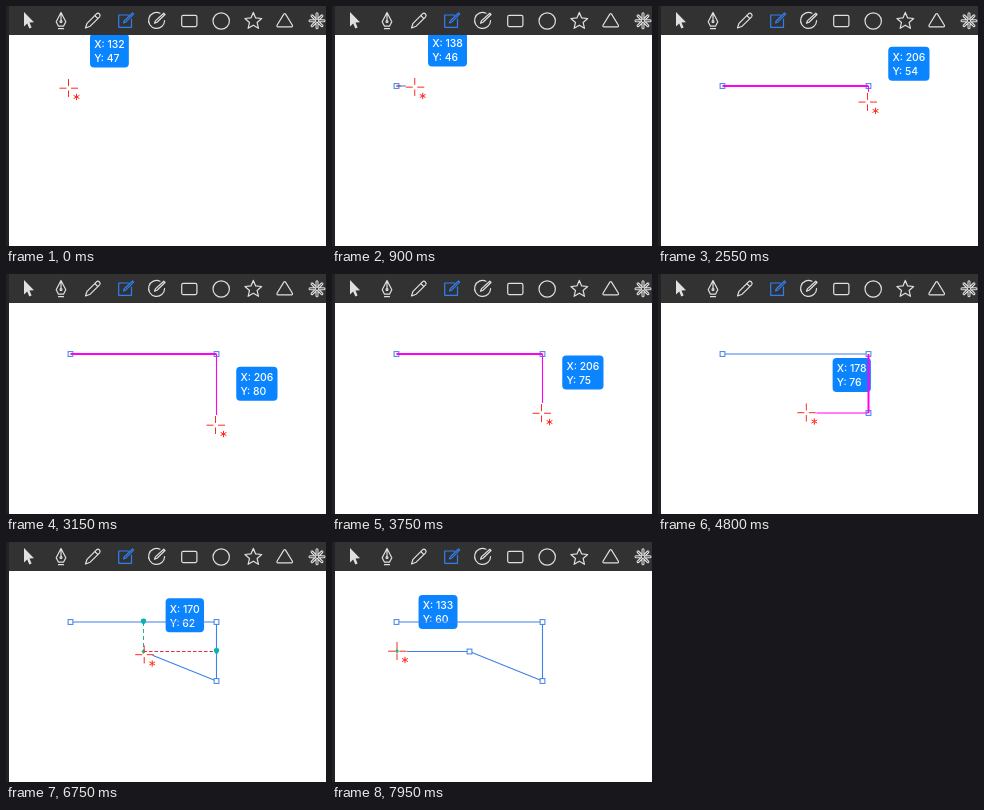
Animation of 320 by 240 pixels, one loop 8 s. Source, as an HTML page:

```html
<!DOCTYPE html>
<html lang="en">
<head>
<meta charset="utf-8">
<title>Drawing with the polyline tool</title>
<style>
  html, body { margin: 0; width: 100%; height: 100%; overflow: hidden; background: #fff; }
  svg { display: block; width: 320px; height: 240px; }
  text { font: 500 10.4px Inter, Roboto, sans-serif; fill: #fff; white-space: pre; }
  .icons { fill: none; stroke: #e0e0e0; stroke-width: 1.2; stroke-linejoin: round; stroke-linecap: round; }
</style>
</head>
<body>
<svg viewBox="0 0 320 240">
  <rect width="320" height="240" fill="#fff"/>
  <g id="label">
    <rect id="box" height="34" rx="4" fill="#0a84ff"/>
    <text id="tx" x="4.2" y="14.3"></text>
    <text id="ty" x="4.2" y="28.3"></text>
  </g>
  <g id="art" fill="none"></g>
  <g id="cursor" fill="none" stroke="#ff2a20">
    <path d="M-9 0.2H-2M2.5 0.2H9.5M0 -9V-2M0 2.5V9"/>
    <path d="M8 5.8V12.2M5.1 7.4L10.9 10.6M5.1 10.6L10.9 7.4"/>
  </g>
  <rect width="320" height="29" fill="#323233"/>
  <rect width="3" height="240" fill="#222224"/>
  <g class="icons">
    <path d="M18 6V20.5L21.2 17.5L23.3 22.4L25.6 21.4L23.5 16.6L28 16.2Z" fill="#e0e0e0" stroke="none"/>
    <path d="M55 6.5L50.2 15.7L52.5 20.2H57.5L59.8 15.7ZM55 6.5V14.5M52.5 22.7H57.5"/>
    <circle cx="55" cy="15.6" r="1"/>
    <path d="M79.5 22L81 17.3L90.5 7.8Q92 6.6 93.4 8Q94.8 9.4 93.6 10.8L84.2 20.2ZM88.8 9.5L91.9 12.6"/>
    <path d="M122.5 9H112.7V21.3H125.5V13M117.5 17L118.3 14.8L126.5 7L127.7 8.2L119.7 16.2Z" stroke="#2f7ff0"/>
    <path d="M154 7.2A8 8 0 1 0 158.6 14.5M148.5 17.3L149.6 14.6L157.8 7.2L159 8.5L151 16.2Z"/>
    <rect x="175.7" y="9.4" width="15.2" height="11.2" rx="1.5"/>
    <circle cx="215.2" cy="15" r="8.2"/>
    <path id="star"/>
    <path d="M278 7.9Q278.7 7.1 279.4 7.9L286.4 19.3Q286.7 20.8 285.6 20.8H271.8Q270.7 20.8 271 19.3Z"/>
    <path class="burst" stroke-width="3"/>
    <path class="burst" stroke="#323233" stroke-width=".9"/>
  </g>
</svg>
<script>
const LOOP = 8000, STEP = 150, LAG = 60;
const BLUE = '#3d80ea', PINK = '#ff00f4', RED = '#e8283c', GREEN = '#27b47a', TEAL = '#00b5ad';
const el = id => document.getElementById(id);

// corners of the shape
const A = [64.5, 80], B = [210.5, 80], C = [210.5, 139], D = [137.5, 109.5];

// pointer moves: start, end, target x, target y
const HOME = [62.5, 82];
const moves = [
  [0, 450, 64, 80.5],
  [600, 1700, 209.5, 84],
  [2280, 3150, 209.5, 151],
  [3150, 3600, 209.5, 131],
  [3600, 3800, 209.5, 140],
  [4050, 5070, 140, 142],
  [5250, 5400, 139, 139.5],
  [5700, 6150, 138.5, 112.5],
  [6700, 7350, 66, 110.5],
  [7650, 7950, 65, 109]
];
const clicks = [750, 2100, 4200, 5850, 6900];

const ease = u => u * u * u * (10 + u * (6 * u - 15));
const mix = (a, b, u) => a.map((v, i) => v + (b[i] - v) * u);

function pointer(t) {
  return moves.reduce((pos, [from, to, ...goal]) => {
    const u = Math.min(1, Math.max(0, (t - from) / (to - from)));
    return mix(pos, goal, ease(u));
  }, HOME);
}

const line = (a, b, color, width = 1.1, dash = '') =>
  `<path d="M${a}L${b}" stroke="${color}" stroke-width="${width}" stroke-dasharray="${dash}"/>`;
const node = ([x, y]) =>
  `<rect x="${x - 2.4}" y="${y - 2.4}" width="4.8" height="4.8" fill="#fff" stroke="${BLUE}"/>`;
const dot = ([x, y]) =>
  `<path d="M${x - 2.7} ${y - 1}a2.7 2.4 0 0 1 5.4 0q0 1.6 -2.7 4q-2.7 -2.4 -2.7 -4Z" fill="${TEAL}"/>`;
const spark = ([x, y]) => `<path d="M${x} ${y - 2.5}l2 2.5l-2 2.5l-2 -2.5Z" fill="${GREEN}"/>`;

// the rubber band stops short of the pointer
function band(a, tip, color, gap = 10) {
  const len = Math.hypot(tip[0] - a[0], tip[1] - a[1]);
  return len > gap ? line(a, mix(a, tip, 1 - gap / len), color) : '';
}

function guides() {
  const top = [D[0], A[1]], side = [B[0], D[1]];
  return line(top, D, GREEN, 1, '4 3') + line(D, side, RED, 1, '3.5 2') + dot(top) + dot(side) + spark(D);
}

function artwork(stage, t, x, y) {
  const edges = line(A, B, BLUE) + line(B, C, BLUE);
  const nodes = [A, B, C].map(node).join('');
  switch (stage) {
    case 0: return '';
    case 1: return node(A) + band(A, [x + 1, A[1]], BLUE) + band(A, [x, A[1]], RED, 14);
    case 2: return node(A) + node(B) + line(A, B, PINK, 2) + band(B, [B[0], y], PINK);
    case 3: return line(A, B, BLUE) + nodes + line(B, C, PINK, 2) + band(C, [x, C[1]], PINK);
    case 4: return edges + band(C, [x - 1, y - 3], BLUE) + nodes + (t >= 6150 ? guides() : '');
    default: return edges + line(C, D, BLUE) + band(D, [x, y + .5], BLUE) + nodes + node(D) +
      (t >= 7800 ? spark([x, y]) : '');
  }
}

const place = (id, x, y) => el(id).setAttribute('transform', `translate(${x} ${y})`);

function draw(t) {
  const stage = clicks.filter(c => c <= t).length;
  let [x, y] = pointer(t);

  // the readout trails sideways and follows the unsnapped height
  const X = 132 + (pointer(t - LAG)[0] - HOME[0]) * .503;
  const Y = 46.8 + (y - HOME[1]) * .487;
  el('tx').textContent = 'X: ' + Math.round(X);
  el('ty').textContent = 'Y: ' + Math.round(Y);
  el('box').setAttribute('width', el('tx').getComputedTextLength() + 8.4);
  place('label', 84 + (X - 132) * 1.978, 28 + (Y - 47) * 1.935);

  if (stage === 3) y = C[1] - .5;
  place('cursor', x, y);
  el('art').innerHTML = artwork(stage, t, x, y);
}

function ring(cx, cy, count, ...radii) {
  return Array.from({ length: count }, (_, i) => {
    const a = i * 2 * Math.PI / count - Math.PI / 2, r = radii[i % radii.length];
    return [cx + r * Math.cos(a), cy + r * Math.sin(a)];
  });
}
el('star').setAttribute('d', 'M' + ring(247.3, 15.2, 10, 8.8, 4).join('L') + 'Z');
const inner = ring(311, 14.8, 8, 2.5), outer = ring(311, 14.8, 8, 7);
const rays = inner.map((p, i) => `M${p}L${outer[i]}`).join('');
document.querySelectorAll('.burst').forEach(p => p.setAttribute('d', rays));

let shown = -1;
const start = performance.now();
function tick() {
  const t = Math.floor((performance.now() - start) % LOOP / STEP) * STEP;
  if (t !== shown) draw(shown = t);
  requestAnimationFrame(tick);
}
tick();
</script>
</body>
</html>
```
